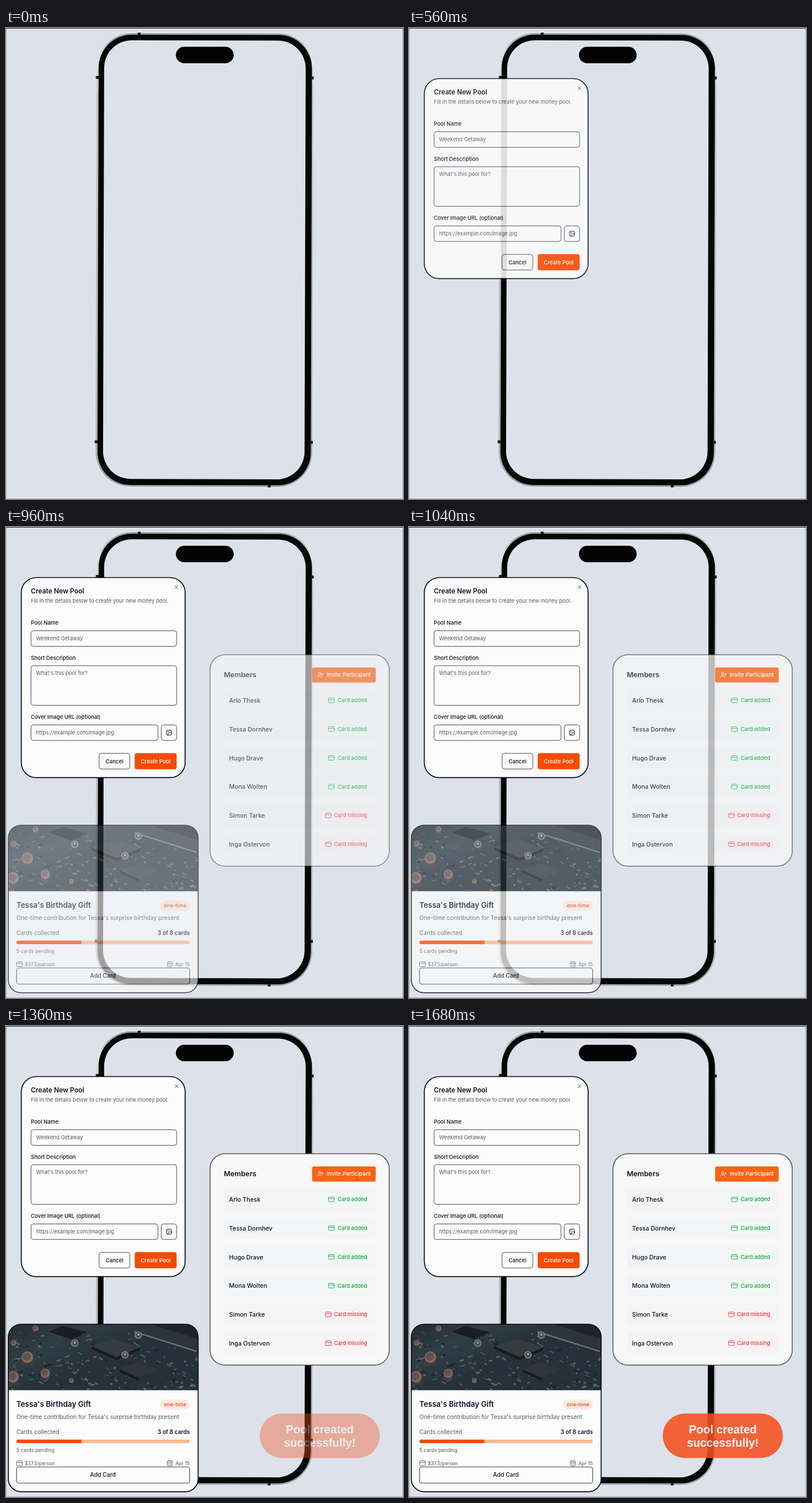
Write an HTML page with a canvas that moves like this. It is 687 by 815 pixels and loops after 1.76 s.

```html
<!DOCTYPE html>
<html lang="en">
<head>
<meta charset="utf-8">
<title>Money pool</title>
<style>
  html, body { margin: 0; width: 100%; height: 100%; overflow: hidden; background: #dde2ea; }
  canvas { position: absolute; left: 0; top: 0; }
</style>
</head>
<body>
<script>
const W = 687, H = 815, TAU = Math.PI * 2;
const STEP = 80, STEPS = 22, FADE = 8;
const INK = '#0f1222', GRAY = '#575961', ORANGE = '#f54a00';

function layer(draw) {
  const canvas = document.createElement('canvas');
  canvas.width = W;
  canvas.height = H;
  document.body.append(canvas);
  draw(canvas.getContext('2d'));
  return canvas;
}

// Rounded box given by its edges.
function box(c, x0, y0, x1, y1, r, fill, stroke, line = 1) {
  c.beginPath();
  c.roundRect(x0, y0, x1 - x0, y1 - y0, r);
  if (fill) { c.fillStyle = fill; c.fill(); }
  if (stroke) { c.strokeStyle = stroke; c.lineWidth = line; c.stroke(); }
}

function text(c, str, x, y, size, color = INK, weight = 400, align = 'left', family = 'Inter') {
  c.font = `${weight} ${size}px ${family}, sans-serif`;
  c.textAlign = align;
  c.fillStyle = color;
  c.fillText(str, x, y);
}

function lines(c, path, color, width = 1) {
  c.strokeStyle = color;
  c.lineWidth = width;
  c.stroke(new Path2D(path));
}

function dot(c, x, y, r, fill) {
  c.beginPath();
  c.arc(x, y, r, 0, TAU);
  c.fillStyle = fill;
  c.fill();
}

function cardIcon(c, x, y, color) {
  box(c, x, y - 4, x + 10, y + 4, 1.3, null, color, 0.9);
  lines(c, `M${x} ${y - 1.3}h10`, color, 0.9);
}

function drawPhone(c) {
  c.fillStyle = '#dde2ea';
  c.fillRect(0, 0, W, H);
  c.fillStyle = '#aab4c6';
  c.fillRect(0, 0, 1, H);
  c.fillRect(W - 1, 0, 1, H);
  c.fillRect(0, H - 1, W, 1);
  c.fillStyle = '#292c38';
  c.fillRect(0, 0, W, 1);

  c.save();
  c.filter = 'blur(0.5px)';
  c.translate(343.5, 402);
  c.rotate(0.0029);
  c.translate(-343.5, -402);
  const rim = c.createLinearGradient(0, 9, 0, 794);
  rim.addColorStop(0, '#8f9092');
  rim.addColorStop(0.05, '#e4e5e7');
  rim.addColorStop(0.14, '#bcbec1');
  rim.addColorStop(0.9, '#b2b3b5');
  rim.addColorStop(1, '#98999b');
  box(c, 156, 9.5, 531, 793.5, 60, rim);
  box(c, 159.3, 12, 528.5, 791, 57, '#050606');
  box(c, 168.9, 21.5, 517.6, 780.7, 48, '#dde2ea');
  c.restore();

  c.fillStyle = '#17181b';
  for (const [x, y] of [[155.5, 83], [527, 84], [153.5, 713.5], [525.5, 714.5]]) c.fillRect(x, y, 5.5, 5);
  c.fillRect(228, 8, 5, 5);
  c.fillRect(453, 790, 5, 5);
  box(c, 294, 32.5, 394, 61, 14.2, '#020202');
}

function drawForm(c) {
  const border = '#4c4e56';
  box(c, 26.5, 87.5, 310, 433.7, 26, '#fcfcfc', '#0d0e14', 1.7);
  text(c, 'Create New Pool', 43, 115, 11.5, INK, 600);
  lines(c, 'M292 101.2l6 6M298 101.2l-6 6', '#41434a', 0.9);
  text(c, 'Fill in the details below to create your new money pool.', 43, 131, 9.2, GRAY);

  text(c, 'Pool Name', 43, 169, 9.3, INK, 500);
  box(c, 43.3, 179.5, 295.2, 206.5, 4, null, border);
  text(c, 'Weekend Getaway', 52, 196.3, 9.2, GRAY);

  text(c, 'Short Description', 43, 230, 9.3, INK, 500);
  box(c, 43.3, 240, 295.2, 308.5, 4, null, border);
  text(c, "What's this pool for?", 52, 256, 9.2, GRAY);

  text(c, 'Cover Image URL (optional)', 43, 332, 9.2, INK, 500);
  box(c, 43.3, 342.5, 263, 369.3, 4, null, border);
  text(c, 'https://example.com/image.jpg', 52, 359.3, 9.2, GRAY);
  box(c, 268.7, 342.5, 295.2, 369.3, 4, null, border);
  box(c, 277.7, 351.7, 286.3, 360.1, 1.5, null, INK, 1);
  lines(c, 'M279 360l4.8-4.6 2.5 2.4', INK, 1);
  dot(c, 280.4, 354.4, 0.9, INK);

  box(c, 161, 391.7, 214.3, 418.8, 4, null, border);
  text(c, 'Cancel', 187.6, 408.6, 9.3, INK, 500, 'center');
  box(c, 222.7, 391.3, 295.3, 419.2, 4, ORANGE);
  text(c, 'Create Pool', 259, 408.6, 9.3, '#fff', 500, 'center');
}

function drawMembers(c) {
  box(c, 353, 221, 663.2, 586.8, 26, '#f8f8f8', '#55565a', 1.5);
  text(c, 'Members', 377, 260.4, 12.3, INK, 600);
  box(c, 529.7, 243, 639.8, 269.3, 3, '#f96316');
  c.beginPath();
  c.arc(542.8, 253.6, 2, 0, TAU);
  lines(c, 'M539.3 260.5v-.8q0-2 2-2h3q2 0 2 2v.8M547.4 253v4M545.6 255h3.6', '#fff', 0.9);
  c.stroke();
  text(c, 'Invite Participant', 555, 259.4, 9.5, '#fff', 500);

  const names = ['Arlo Thesk', 'Tessa Dornhev', 'Hugo Drave', 'Mona Wolten', 'Simon Tarke', 'Inga Ostervon'];
  names.forEach((name, i) => {
    const y = 300 + i * 49.75, added = i < 4, x = added ? 558 : 553;
    const color = added ? '#1f9a47' : '#d83840';
    box(c, 377.3, y - 18.5, 640, y + 18.5, 5, '#f4f5f6');
    text(c, name, 386, y + 4, 10.5, INK, 500);
    box(c, x - 7, y - 10, 631.5, y + 10, 10, added ? '#eefbf3' : '#fdf0f1');
    cardIcon(c, x, y, color);
    text(c, added ? 'Card added' : 'Card missing', 625, y + 3.4, 9.2, color, 500, 'right');
  });
}

// Circuit board photo reduced to flat shapes.
function drawBoard(c) {
  c.save();
  c.beginPath();
  c.rect(4, 516, 329, 114.3);
  c.clip();

  const base = c.createLinearGradient(0, 516, 60, 630);
  base.addColorStop(0, '#242b31');
  base.addColorStop(0.5, '#2f3e45');
  base.addColorStop(1, '#253138');
  c.fillStyle = base;
  c.fillRect(4, 516, 329, 115);

  let seed = 7;
  const rand = () => (seed = seed * 16807 % 2147483647) / 2147483647;
  const tones = ['#41555d', '#1b242a', '#59686d', '#6b5b57', '#26343b'];
  for (let i = 0; i < 240; i++) {
    c.save();
    c.translate(4 + rand() * 328, 528 + rand() * 102);
    c.rotate(rand() < 0.5 ? -0.3 : 0.5);
    c.fillStyle = tones[i % tones.length];
    c.fillRect(0, 0, 2 + rand() * 7, 1 + rand() * 2.5);
    c.restore();
  }

  const shape = (path, fill) => { c.fillStyle = fill; c.fill(new Path2D(path)); };
  shape('M222 516H333V562L220 530Z', '#2c343a');
  shape('M250 516H333V542Z', '#1d252b');
  lines(c, 'M222 529L330 563', '#646e73', 2.5);
  shape('M74 529l24-10 42 11-27 12z', '#181e24');
  shape('M148 554l38-13 47 15-42 17z', '#343b41');
  shape('M148 554l43 19v5l-43-19zM191 573l42-17v5l-42 17z', '#151b20');
  shape('M197 594l31-12 34 13-32 14z', '#2f363c');
  shape('M197 594l33 15v5l-33-15z', '#151b20');

  for (const [x, y, r] of [[37, 573, 10], [12, 607, 10], [68, 601, 8], [13, 548, 5], [113, 613, 4], [51, 523, 5]]) {
    box(c, x - r, y, x + r, y + r * 1.4, 3, '#423a3b');
    dot(c, x, y, r, '#806760');
    dot(c, x - 1, y - 1, r * 0.7, '#625150');
  }
  for (const [x, y] of [[206, 569], [229, 535], [119, 549]]) {
    dot(c, x, y, 6.5, '#94736b');
    dot(c, x, y, 4.5, '#34515e');
    dot(c, x, y - 1, 2, '#8aa3ac');
  }
  c.restore();
}

function drawGift(c) {
  c.save();
  c.beginPath();
  c.roundRect(4, 516, 328.5, 290, 22);
  c.clip();
  c.fillStyle = '#fcfcfc';
  c.fillRect(4, 516, 329, 290);
  drawBoard(c);
  c.restore();
  box(c, 4, 516, 332.5, 805.8, 22, null, '#0d0e14', 1.7);

  text(c, "Tessa's Birthday Gift", 18, 659.4, 12.9, INK, 600);
  box(c, 267, 646.5, 318, 664, 8.7, '#ffeae0');
  text(c, 'one-time', 292.5, 658, 9, '#dc4a14', 500, 'center');
  text(c, "One-time contribution for Tessa's surprise birthday present", 18, 680.3, 10.05, GRAY);
  text(c, 'Cards collected', 18, 706.4, 10, GRAY);
  text(c, '3 of 8 cards', 318, 706.4, 9.7, INK, 600, 'right');

  box(c, 18, 715.8, 318, 721.8, 3, '#fdba8c');
  box(c, 18, 715.8, 130.5, 721.8, [3, 0, 0, 3], ORANGE);
  text(c, '5 cards pending', 18, 736.6, 8.6, GRAY);

  cardIcon(c, 18.3, 756.6, GRAY);
  text(c, '$37.5/person', 32.5, 759.8, 8.4, GRAY);
  box(c, 279.2, 752.6, 288, 761, 1.3, null, GRAY, 0.9);
  lines(c, 'M279.2 755.4h8.8M281.5 751.4v2M285.7 751.4v2M281 758h5.4', GRAY, 0.9);
  text(c, 'Apr 15', 318, 759.8, 8.4, GRAY, 400, 'right');

  box(c, 18.2, 763, 317.8, 791, 4, '#fcfcfc', '#3c3e45', 1.1);
  text(c, 'Add Card', 167.7, 780.3, 9.9, INK, 500, 'center');
}

function drawToast(c) {
  box(c, 439, 670.5, 647, 747.5, 38.5, '#f7501e');
  for (const [line, y] of [['Pool created', 705.3], ['successfully!', 728]]) {
    text(c, line, 543, y, 19.6, '#fff', 700, 'center', 'Liberation Sans, Arial');
  }
}

layer(drawPhone);
const fades = [
  [layer(drawForm), 1],
  [layer(drawMembers), 8],
  [layer(drawGift), 8],
  [layer(drawToast), 15],
];

function render(now) {
  const step = Math.floor(now / STEP) % STEPS;
  for (const [canvas, start] of fades) {
    canvas.style.opacity = Math.min(1, Math.max(0, (step - start + 1) / FADE));
  }
}

const begin = performance.now();
function tick() {
  render(performance.now() - begin);
  requestAnimationFrame(tick);
}
tick();
</script>
</body>
</html>
```
